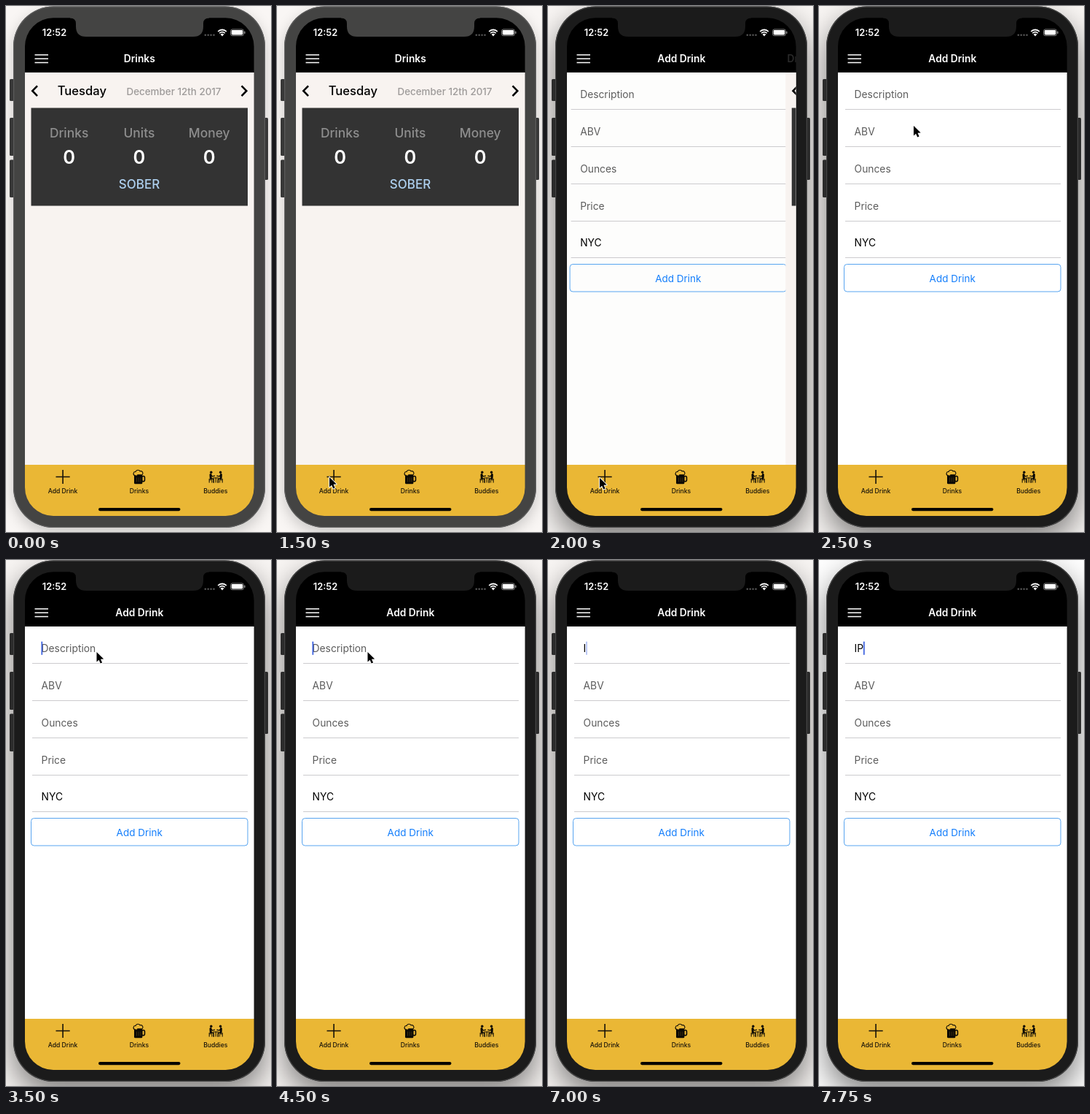
Recreate the animation shown at these times as an HTML page with a canvas. Size 364x720 px, loop 8000 ms.

```html
<!DOCTYPE html>
<html lang="en">
<head>
<meta charset="utf-8">
<title>Drink log</title>
<style>
html, body { margin: 0; width: 100%; height: 100%; overflow: hidden; background: #fff; }
canvas { display: block; width: 364px; height: 720px; }
</style>
</head>
<body>
<canvas id="stage"></canvas>
<script>
const W = 364, H = 720, LOOP = 8000, STEP = 250;
const canvas = document.getElementById('stage');
const c = canvas.getContext('2d');
const dpr = window.devicePixelRatio || 1;
canvas.width = W * dpr;
canvas.height = H * dpr;

// Pointer positions: [time, x, y], each held until the next
const pointer = [
  [500, 158, 549], [1000, 126.5, 598], [1250, 84.5, 636], [1500, 72, 645],
  [1750, 71, 646], [2250, 102, 345], [2500, 130, 164], [2750, 127.5, 145],
  [3000, 125.5, 137], [3250, 124.5, 126]
];
const POINTER_OFF = 5000, FOCUS = 1750, EDIT = 3500, TYPE_I = 7000, TYPE_P = 7750;

function rect(x, y, w, h, color) {
  c.fillStyle = color;
  c.fillRect(x, y, w, h);
}

function round(x, y, w, h, r, color) {
  c.beginPath();
  c.roundRect(x, y, w, h, r);
  c.fillStyle = color;
  c.fill();
}

function dot(x, y, r, color) {
  c.beginPath();
  c.arc(x, y, r, 0, Math.PI * 2);
  c.fillStyle = color;
  c.fill();
}

function line(points, width, color, cap = 'butt') {
  c.beginPath();
  points.forEach(([x, y], i) => i ? c.lineTo(x, y) : c.moveTo(x, y));
  c.lineWidth = width;
  c.strokeStyle = color;
  c.lineCap = cap;
  c.lineJoin = 'miter';
  c.stroke();
}

function text(s, x, y, size, weight, color, align = 'center') {
  c.font = `${weight} ${size}px Inter, "Liberation Sans", sans-serif`;
  c.textAlign = align;
  c.fillStyle = color;
  c.fillText(s, x, y);
}

function layer(dx, draw) {
  c.save();
  c.translate(dx, 0);
  draw();
  c.restore();
}

function body(t) {
  const active = t >= FOCUS;
  const shell = active ? '#1b1b1b' : '#444443';
  const button = active ? '#2b2b2b' : '#383838';
  rect(0, 0, W, H, t >= 7500 ? '#ffffff' : '#f9f6f4');
  c.save();
  c.shadowColor = active ? 'rgba(0,0,0,.5)' : 'rgba(0,0,0,.2)';
  c.shadowBlur = (active ? 42 : 20) * dpr;
  c.shadowOffsetY = (active ? 17 : 7) * dpr;
  round(10, .5, 346, 713.5, 55, shell);
  c.restore();
  [[5, 100, 30], [5, 153, 52], [5, 210.5, 51.5], [354, 153, 85]]
    .forEach(([x, y, h]) => round(x, y, 6, h, 1.5, button));
  round(10, .5, 346, 713.5, 55, active ? '#454545' : '#5c5c5c');
  round(11.2, 1.7, 343.6, 711.1, 54, shell);
  return shell;
}

function notch(color) {
  c.beginPath();
  c.moveTo(88, 14);
  c.lineTo(88, 16.5);
  c.quadraticCurveTo(96, 16.5, 96, 24);
  c.lineTo(96, 28);
  c.quadraticCurveTo(96, 42, 110, 42);
  c.lineTo(257, 42);
  c.quadraticCurveTo(271, 42, 271, 28);
  c.lineTo(271, 24);
  c.quadraticCurveTo(271, 16.5, 279, 16.5);
  c.lineTo(279, 14);
  c.closePath();
  c.fillStyle = color;
  c.fill();
}

function statusBar() {
  text('12:52', 66.5, 41, 12.8, 600, '#fff');
  for (let i = 0; i < 4; i++) dot(273.8 + i * 3.9, 39.7, 1.3, '#555');
  c.save();
  c.beginPath();
  c.moveTo(297, 41.5);
  c.lineTo(289, 32.5);
  c.lineTo(289, 28);
  c.lineTo(305, 28);
  c.lineTo(305, 32.5);
  c.closePath();
  c.clip();
  dot(297, 40.5, 2.8, '#fff');
  c.strokeStyle = '#fff';
  c.lineWidth = 1.8;
  [4.9, 8].forEach(r => {
    c.beginPath();
    c.arc(297, 40.5, r, Math.PI, 0);
    c.stroke();
  });
  c.restore();
  c.beginPath();
  c.roundRect(308.5, 31.9, 18, 8.8, 2.4);
  c.lineWidth = .8;
  c.strokeStyle = '#999';
  c.stroke();
  round(309.7, 33.1, 15.6, 6.4, 1.4, '#fff');
  round(327.4, 34.7, 1.1, 3.2, .5, '#999');
}

function dayPage() {
  rect(26, 91, 315, 537, '#f8f3f0');
  line([[43, 109.3], [36.3, 116.2], [43, 123.1]], 2.6, '#000');
  line([[323.6, 109.3], [330.3, 116.2], [323.6, 123.1]], 2.6, '#000');
  text('Tuesday', 104.3, 122, 16.6, 500, '#000');
  text('December 12th 2017', 230.5, 121.7, 13.4, 500, '#9d9a99');
  rect(34.5, 139.5, 297.5, 134, '#333');
  ['Drinks', 'Units', 'Money'].forEach((label, i) => {
    const x = 86.6 + i * 96.3;
    text(label, x, 179.6, 17.4, 500, '#8e8e8e');
    text('0', x, 216, 25.5, 600, '#fff');
  });
  text('SOBER', 183, 250, 17, 500, '#aed0ef');
}

function caret(t, x) {
  const phase = t % 1000;
  // Lit for half a second, then fading, then gone
  const beat = (phase + 500) % 1000;
  const alpha = t >= TYPE_P || beat < 500 ? 1 : beat < 750 ? .4 : 0;
  c.globalAlpha = alpha;
  round(x, 111.5, 1.8, 18.5, .8, '#4267e0');
  c.globalAlpha = 1;
}

function formPage(t) {
  rect(26, 91, 330, 537, t < 2250 ? '#fdfdfc' : '#fff');
  const typed = t >= TYPE_P ? 'IP' : t >= TYPE_I ? 'I' : '';
  const rows = [typed || 'Description', 'ABV', 'Ounces', 'Price', 'NYC'];
  rows.forEach((s, i) => {
    const y = 126 + i * 50.85;
    const filled = i === 4 || (i === 0 && typed);
    text(s, 48.6, y, 13.8, 400, filled ? '#000' : '#5c5c5c', 'left');
    rect(36, Math.round(y + 15), 296, 1, '#cccbce');
  });
  c.beginPath();
  c.roundRect(34.5, 353.5, 297.5, 37.5, 4);
  c.lineWidth = 1;
  c.strokeStyle = '#58a5f0';
  c.stroke();
  text('Add Drink', 183.2, 377.5, 13.5, 400, '#147efb');
  if (t >= EDIT) {
    c.font = '400 13.8px Inter, "Liberation Sans", sans-serif';
    caret(t, 48.4 + c.measureText(typed).width);
  }
}

function mug() {
  round(176, 641.5, 11.4, 12.7, 1.5, '#0b0905');
  c.beginPath();
  c.roundRect(186.5, 643.5, 4, 7.2, 2);
  c.lineWidth = 1.6;
  c.strokeStyle = '#0b0905';
  c.stroke();
  c.beginPath();
  c.moveTo(176.6, 642.6);
  c.bezierCurveTo(173.8, 641, 175.2, 637.2, 178, 637.6);
  c.bezierCurveTo(179, 634.6, 183, 634.6, 184, 636.8);
  c.bezierCurveTo(187.6, 635.8, 189.2, 639.8, 187, 641.8);
  c.lineTo(180.8, 641.8);
  c.lineTo(179.8, 643.4);
  c.closePath();
  c.fillStyle = '#eab735';
  c.fill();
  c.lineWidth = 1.1;
  c.stroke();
  [179, 181.8, 184.6].forEach(x => rect(x, 645.5, .6, 6, '#5c4817'));
}

function buddy(x, dir) {
  const p = (dx, y) => [x + dx * dir, y];
  dot(x + .8 * dir, 638.3, 1.7, '#0b0905');
  line([p(0, 641.4), p(.3, 646.6)], 3, '#0b0905', 'round');
  line([p(.5, 641.6), p(2.4, 643.8), p(5.6, 643.2)], 1.2, '#0b0905', 'round');
  line([p(.3, 647), p(4, 647.4), p(4.2, 652.2)], 1.5, '#0b0905', 'round');
  line([p(-1.8, 647), p(-1.8, 652.6)], 1, '#0b0905');
  line([p(-1.8, 648.8), p(1.8, 648.8), p(1.8, 652.6)], .9, '#0b0905');
}

function tabBar() {
  rect(26, 628, 315, 71, '#eab735');
  line([[68.5, 644.5], [87.7, 644.5]], 1.6, '#16120a');
  line([[78.1, 635], [78.1, 654]], 1.6, '#16120a');
  mug();
  buddy(281, 1);
  buddy(295.4, -1);
  rect(284.2, 645.4, 8, 1, '#0b0905');
  rect(287.7, 646, 1, 6.5, '#0b0905');
  ['Add Drink', 'Drinks', 'Buddies'].forEach((s, i) =>
    text(s, 78 + i * 104.9, 666.6, 8.6, 500, '#16120a'));
  round(127, 687, 112.5, 4.2, 2.1, '#080500');
}

function arrow(x, y) {
  c.save();
  c.translate(x, y);
  c.beginPath();
  c.moveTo(0, 0);
  [[0, 13.6], [3.1, 10.7], [5.2, 15.6], [7.6, 14.6], [5.5, 9.8], [9.7, 9.6]]
    .forEach(p => c.lineTo(...p));
  c.closePath();
  c.lineJoin = 'round';
  c.lineWidth = 1.8;
  c.strokeStyle = '#fff';
  c.stroke();
  c.fillStyle = '#000';
  c.fill();
  c.restore();
}

function draw(t) {
  c.setTransform(dpr, 0, 0, dpr, 0, 0);
  const shell = body(t);
  const slide = t < 1750 ? 0 : t < 2000 ? .5 : t < 2250 ? 300.3 : 315;
  const under = -.3 * (315 - slide);

  c.save();
  c.beginPath();
  c.roundRect(26, 16.3, 314.6, 681.7, 39);
  c.clip();
  if (slide > 1) layer(under, () => formPage(t));
  if (slide < 315) layer(slide, dayPage);
  rect(26, 16, 315, 75, '#000');
  if (slide < 1) {
    text('Drinks', 183.3 + slide, 77.2, 13.8, 600, '#fff');
  } else {
    text('Add Drink', 183.3, 77.2, 13.8, 600, '#fff');
    if (slide < 315) text('Drinks', 350, 77.2, 13.8, 600, '#2a2a2a');
  }
  [66.9, 72.2, 77.5].forEach(y => rect(39.5, y - .75, 18.5, 1.5, '#fff'));
  statusBar();
  tabBar();
  c.restore();
  notch(shell);

  const at = pointer.filter(p => p[0] <= t).pop();
  if (at && t < POINTER_OFF) arrow(at[1], at[2]);
}

function tick() {
  const t = performance.now() % LOOP;
  draw(Math.floor(t / STEP) * STEP);
  requestAnimationFrame(tick);
}
tick();
</script>
</body>
</html>
```
